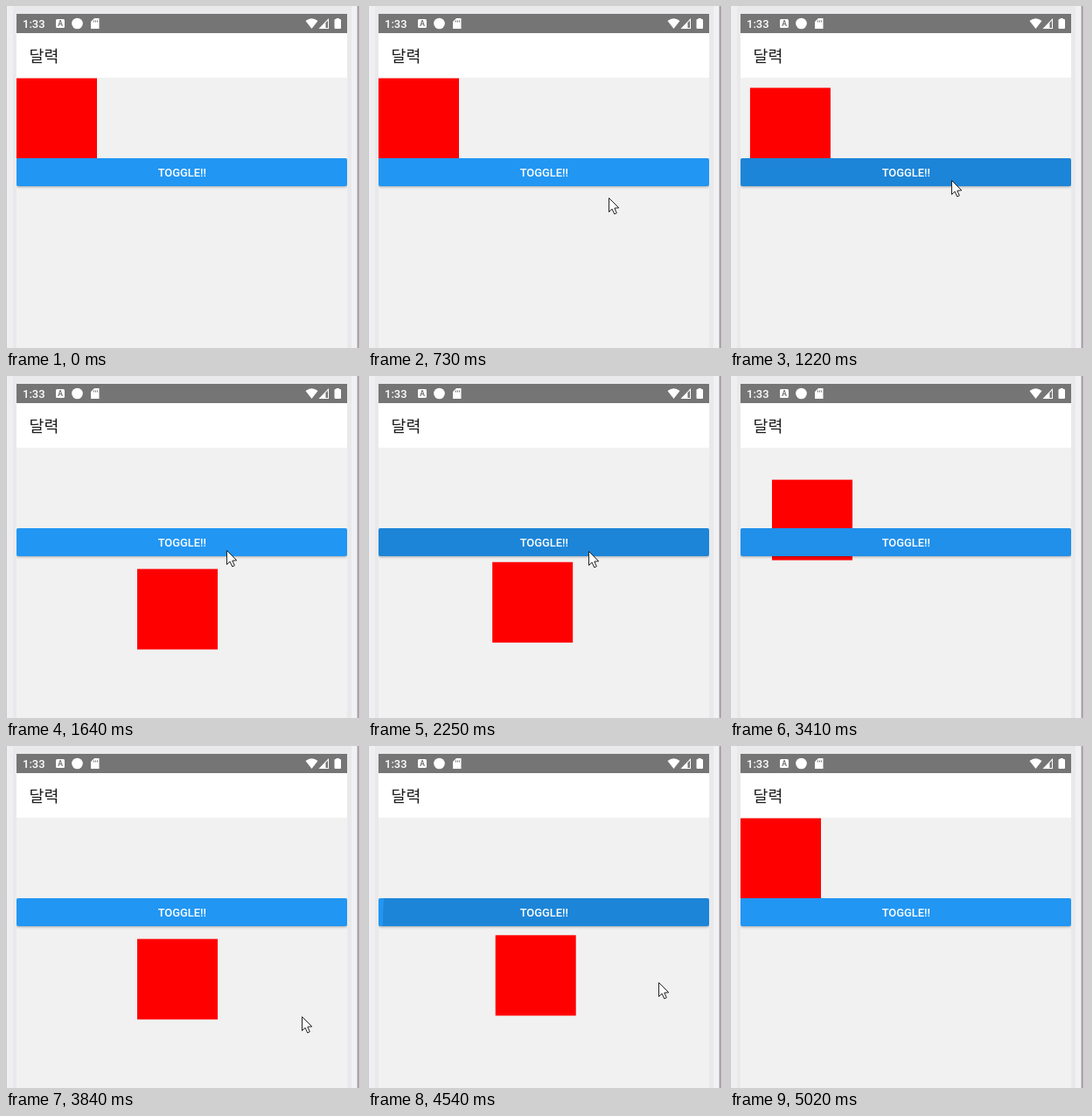
An HTML page with a canvas that plays this animation: 407 by 391 pixels, repeating every 5.48 s.

```html
<!DOCTYPE html>
<html lang="ko">
<head>
<meta charset="utf-8">
<title>Toggle</title>
<style>
html, body { margin: 0; width: 100%; height: 100%; overflow: hidden; background: #f1f1f1; }
canvas { display: block; width: 407px; height: 391px; }
</style>
</head>
<body>
<canvas id="stage"></canvas>
<script>
const W = 407, H = 391, LOOP = 5480;
const LEFT = 12, RIGHT = 390, WIDTH = RIGHT - LEFT;
const TRAVEL = 138;            // how far the box slides on both axes
const TAP = { x: 253, y: 199 };

const canvas = document.getElementById('stage');
const dpr = window.devicePixelRatio || 1;
canvas.width = Math.round(W * dpr);
canvas.height = Math.round(H * dpr);
const ctx = canvas.getContext('2d');
ctx.scale(dpr, dpr);

// Slides alternate between out and back
const SLIDES = [
  { start: 1137, dur: 500 },
  { start: 2176, dur: 538 },
  { start: 3267, dur: 427 },
  { start: 4491, dur: 500 }
];

// Two visits of the pointer: key points in time, then it vanishes
const VISITS = [
  { end: 3300, keys: [
    { t: 130, x: 349, y: 376 }, { t: 330, x: 291, y: 234 }, { t: 530, x: 291, y: 234 },
    { t: 1010, ...TAP }, { t: 2590, x: 251.4, y: 200 }
  ] },
  { end: 4600, keys: [
    { t: 3630, x: 389, y: 376 }, { t: 4190, ...TAP }, { t: 4470, ...TAP },
    { t: 4540, x: 332, y: 270 }
  ] }
];

const clamp = v => Math.min(1, Math.max(0, v));
const mix = (a, b, p) => a + (b - a) * p;

// cubic-bezier(.42, 0, 1, 1)
function easeIn(x) {
  let lo = 0, hi = 1;
  for (let i = 0; i < 24; i++) {
    const s = (lo + hi) / 2, r = 1 - s;
    if (1.26 * s * r * r + 3 * s * s * r + s * s * s < x) lo = s; else hi = s;
  }
  return lo * lo * (3 - 2 * lo);
}
const easeInOut = p => p < 0.5 ? easeIn(2 * p) / 2 : 1 - easeIn(2 - 2 * p) / 2;

function rect(x, y, w, h, color) {
  ctx.fillStyle = color;
  ctx.fillRect(x, y, w, h);
}

function shape(d, color) {
  const path = new Path2D(d);
  ctx.fillStyle = color;
  ctx.fill(path);
  return path;
}

function rounded(x, y, w, h, r, color) {
  ctx.beginPath();
  ctx.roundRect(x, y, w, h, r);
  ctx.fillStyle = color;
  ctx.fill();
}

function disc(x, y, r, color) {
  ctx.beginPath();
  ctx.arc(x, y, r, 0, 2 * Math.PI);
  ctx.fillStyle = color;
  ctx.fill();
}

function text(str, x, y, font, color, align = 'left') {
  ctx.font = font;
  ctx.textAlign = align;
  ctx.fillStyle = color;
  ctx.fillText(str, x, y);
}

function drawBezel() {
  rect(0, 0, W, 9, '#e9e9eb');
  rect(0, 0, 8, H, '#efeff1');
  rect(0, 0, 1, H, '#cbc8cb');
  rect(8, 9, 4, H, '#e9e9eb');
  rect(RIGHT, 9, 5, H, '#e9e9eb');
  rect(395, 0, 6, H, '#f1f1f3');
  rect(401, 0, 6, H, '#d2ced1');
  rect(402, 0, 1, H, '#9d979b');
  rect(403, 0, 1, H, '#b9b4b7');
}

function drawStatusBar() {
  const bar = '#757575', ink = '#fff';
  rect(LEFT, 9, WIDTH, 22, bar);
  text('1:33', 19, 24.7, '500 13px Roboto, sans-serif', ink);

  rounded(57, 15, 10, 10, 1.5, ink);
  text('A', 62, 23, 'bold 8.5px Roboto, sans-serif', bar, 'center');

  disc(81.5, 20, 6.3, ink);

  // Memory card
  shape('M101 14H106.5V26H97V18Z', ink);
  for (let x = 100; x < 106; x += 2) rect(x, 16.5, 1, 2, bar);

  // Wi-Fi, signal, battery
  shape('M349.5 26L342.5 17Q349.5 11.5 356.5 17Z', ink);
  shape('M369 14V26H357.5Z', ink);
  shape('M368 16.6V25H365.5V19.2Z', bar);
  rounded(375.5, 15, 7.5, 11, 1, ink);
  rect(377.5, 14, 3.5, 2, ink);
}

function drawHeader() {
  rect(LEFT, 31, WIDTH, 51, '#fff');
  text('달력', 26.5, 64, '500 18.4px "Noto Sans CJK KR", "Noto Sans CJK", sans-serif', '#1c1c1e');
}

function drawBox(t) {
  const shift = SLIDES.reduce((sum, s, i) => {
    const p = easeInOut(clamp((t - s.start) / s.dur));
    return sum + (i % 2 ? -p : p) * TRAVEL;
  }, 0);
  rect(LEFT + shift, 82.6 + shift, 92, 92, '#f00');
}

function drawButton(t) {
  const edge = [LEFT, 174, WIDTH, 32, 2];
  ctx.save();
  ctx.beginPath();
  ctx.rect(LEFT, 174, WIDTH, 40);
  ctx.clip();
  ctx.shadowColor = 'rgba(0,0,0,.3)';
  ctx.shadowBlur = 3 * dpr;
  ctx.shadowOffsetY = dpr;
  rounded(...edge, '#2196f3');
  ctx.restore();

  // Touch ripple grows before the slide starts and fades after it
  ctx.save();
  ctx.beginPath();
  ctx.roundRect(...edge);
  ctx.clip();
  for (const { start } of SLIDES) {
    const age = t - start + 90;
    const fade = 1 - clamp((age - 180) / 80);
    if (age > 0) disc(TAP.x, TAP.y, 40 + age * 1.4, `rgba(0,0,0,${0.115 * fade})`);
  }
  ctx.restore();
  text('TOGGLE!!', 201.3, 195.3, '500 12.9px Roboto, sans-serif', '#fff', 'center');
}

function drawPointer(t) {
  const visit = VISITS.find(v => t >= v.keys[0].t && t < v.end);
  if (!visit) return;
  const next = visit.keys.findIndex(k => k.t > t);
  const b = visit.keys.at(next), a = next < 0 ? b : visit.keys[next - 1];
  const p = a === b ? 0 : (t - a.t) / (b.t - a.t);
  ctx.save();
  ctx.translate(Math.round(mix(a.x, b.x, p)) + 0.5, Math.round(mix(a.y, b.y, p)) + 0.5);
  const arrow = shape('M0 0V16L3.6 12.6L6.2 18.4L8.8 17.2L6.3 11.6L11.3 11.3Z', '#fff');
  ctx.strokeStyle = '#222';
  ctx.stroke(arrow);
  ctx.restore();
}

function draw(t) {
  rect(0, 0, W, H, '#f1f1f1');
  drawBezel();
  drawStatusBar();
  drawHeader();
  drawBox(t);
  drawButton(t);
  drawPointer(t);
}

const origin = performance.now();
function loop() {
  draw((performance.now() - origin) % LOOP);
  requestAnimationFrame(loop);
}
loop();
</script>
</body>
</html>
```
